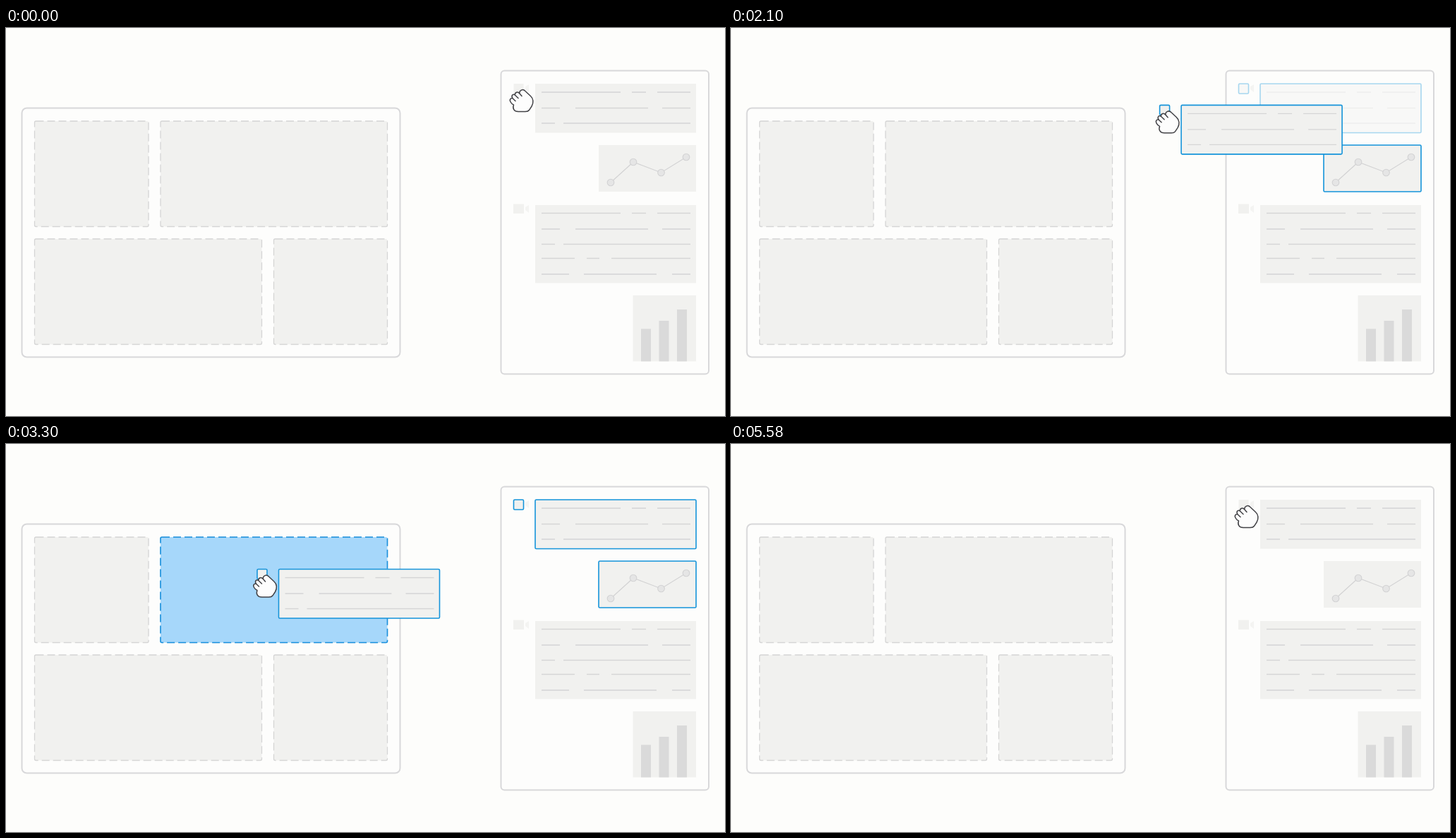
Recreate the animation shown at these times as an HTML page. Size 1019x550 px, loop 5640 ms.

```html
<!DOCTYPE html>
<html lang="en">
<head>
<meta charset="utf-8">
<title>Drag a chart into a layout</title>
<style>
  html, body { margin: 0; width: 100%; height: 100%; overflow: hidden; background: #fdfdfb; }
  svg { display: block; width: 100%; height: 100%; }
  .panel { fill: #fdfdfc; stroke: #d8d8da; stroke-width: 2; }
  .block { fill: #f1f1ef; }
  .cell { fill: #f1f1ef; stroke: #d5d5d5; stroke-width: 1.3; stroke-dasharray: 11 5; }
  .drop { fill: #a6d7fa; stroke: #1790de; stroke-width: 1.6; stroke-dasharray: 11 5; }
  .outline { fill: none; stroke: #1594da; stroke-width: 1.6; }
  .text { fill: none; stroke: #d5d5d6; stroke-width: 1.4; }
  .bars { fill: #dadada; }
  .mark { fill: #f4f4f2; }
  .hand { fill: #fdfdfd; stroke: #424246; stroke-width: 1.5; stroke-linejoin: round; stroke-linecap: round; }
</style>
</head>
<body>
<svg id="stage" viewBox="0 0 1019 550"></svg>
<script>
const LOOP = 5640;
const DRAG = { start: 1570, end: 2950, dx: -363.5, dy: 98.5 };

const rect = (cls, x1, y1, x2, y2, r = 0) =>
  `<rect class="${cls}" x="${x1}" y="${y1}" width="${x2 - x1}" height="${y2 - y1}" rx="${r}"/>`;
const group = (id, ...parts) => `<g id="${id}">${parts.join('')}</g>`;

// Each row is its y followed by start/end pairs of dashes.
const textRows = rows => `<path class="text" d="${rows.map(([y, ...xs]) =>
  xs.map((x, i) => i % 2 ? `H${x}` : `M${x} ${y}`).join('')).join('')}"/>`;

const lineChart = (points, r, width, stroke, fill) =>
  `<g stroke="${stroke}" stroke-width="${width}">
    <polyline fill="none" points="${points.join(' ')}"/>
    ${points.map(([x, y]) => `<circle cx="${x}" cy="${y}" r="${r}" fill="${fill}"/>`).join('')}</g>`;

const firstRows = y => [
  [y, 759, 871, 887, 907, 923, 970],
  [y + 22.5, 759, 785, 807, 910, 930, 970],
  [y + 44, 759, 778, 790, 970]
];
const cells = [
  [40.5, 132, 202, 281.5], [219, 132, 540.5, 281.5],
  [40.5, 299, 362.5, 448.5], [379.5, 299, 540.5, 448.5]
];
const textBox = [750, 79, 978, 148.5];
const chartBox = [840, 166, 978, 232];
const iconBox = [719.5, 79, 733.5, 93];
const points = [[857, 219], [889, 190], [928.5, 205], [964, 183]];
const bigPoints = points.map(([x, y]) => [263 + (x - 857) * 2.27, 254.5 + (y - 219) * 2.29]);

const mark = y => `<path class="mark" d="M741 ${y}V${y + 11}L736 ${y + 7}V${y + 3}Z"/>`;
const paragraph = rect('block', ...iconBox) + rect('block', ...textBox) + textRows(firstRows(91));
const paragraphOutline = rect('outline', ...iconBox, 1.5) + rect('outline', ...textBox, 1.5);

const hand = `<path class="hand" d="M719.5 109C715.5 107 713 102.5 715 100.5C716 99 717.5 99.3 718.3 100
  C715.5 96.5 718 92.5 721.3 95C721 91.5 725 89 728 93C727 88.5 732.5 85.5 736 89.5L743.5 96.5
  C747.5 100 748 106 745 111L741.5 116.3C740 118.4 738 118.5 736 118.5H726C720 118.5 717.5 114 719.5 109Z
  M718.3 100L722 103.5M721.3 95L726 99.5M728 93L731 96.5"/>`;

document.getElementById('stage').innerHTML = [
  rect('panel', 22.5, 113.5, 558.5, 466.5, 7),
  rect('panel', 701.5, 60.5, 996, 490.5, 5),
  ...cells.map(c => rect('cell', ...c, 2)),
  group('drop', rect('drop', ...cells[1], 2)),
  mark(80), mark(251),
  group('source', paragraph, group('sourceOutline', paragraphOutline)),
  rect('block', ...chartBox),
  lineChart(points, 4.8, 1.1, '#d2d2d3', '#e5e5e5'),
  group('chartOutline', rect('outline', ...chartBox, 1.5)),
  rect('block', 719, 249.5, 734, 263),
  rect('block', 750, 251, 978, 361.5),
  textRows([...firstRows(262.5),
    [326.5, 759, 806, 823, 841, 858, 970],
    [349, 759, 798, 819, 922, 944, 970]]),
  rect('block', 888.5, 379, 978, 472.5),
  rect('bars', 900, 426.5, 914, 472.5),
  rect('bars', 925.5, 415, 939.5, 472.5),
  rect('bars', 951, 399, 965, 472.5),
  group('result', lineChart(bigPoints, 10.8, 2.6, '#a4a5a8', '#d6d6d6')),
  group('copy', paragraph, paragraphOutline),
  group('hand', hand)
].join('');

const part = Object.fromEntries(
  [...document.querySelectorAll('g[id]')].map(el => [el.id, el]));

const ramp = (t, from, to) => Math.min(1, Math.max(0, (t - from) / (to - from)));
const fade = (id, opacity) => part[id].setAttribute('opacity', opacity);

// Cubic Bezier (.42, 0, .58, 1), solved by bisection.
function easeInOut(x) {
  let low = 0, high = 1;
  for (let i = 0; i < 20; i++) {
    const s = (low + high) / 2;
    const at = 3 * s * (1 - s) * (0.42 * (1 - s) + 0.58 * s) + s ** 3;
    if (at < x) low = s; else high = s;
  }
  return low * low * (3 - 2 * low);
}

function draw(t) {
  const moved = easeInOut(ramp(t, DRAG.start, DRAG.end));
  const released = ramp(t, 3630, 4140);
  const highlight = ramp(t, 300, 800) * (1 - released);
  const reset = ramp(t, 4960, 5460);
  const shift = `translate(${DRAG.dx * moved} ${DRAG.dy * moved})`;

  fade('source', t < DRAG.start ? 1 : ramp(t, 1770, 2670));
  fade('sourceOutline', highlight);
  fade('chartOutline', highlight);
  fade('drop', ramp(t, 2820, 3240) * (1 - released));
  fade('result', released * (1 - reset));
  fade('copy', t < DRAG.start ? 0 : 1 - released);
  part.copy.setAttribute('transform', shift);

  const returning = t > 4500;
  fade('hand', returning ? reset : 1 - released);
  part.hand.setAttribute('transform', returning ? '' : shift);
}

function tick() {
  draw(performance.now() % LOOP);
  requestAnimationFrame(tick);
}
tick();
</script>
</body>
</html>
```
